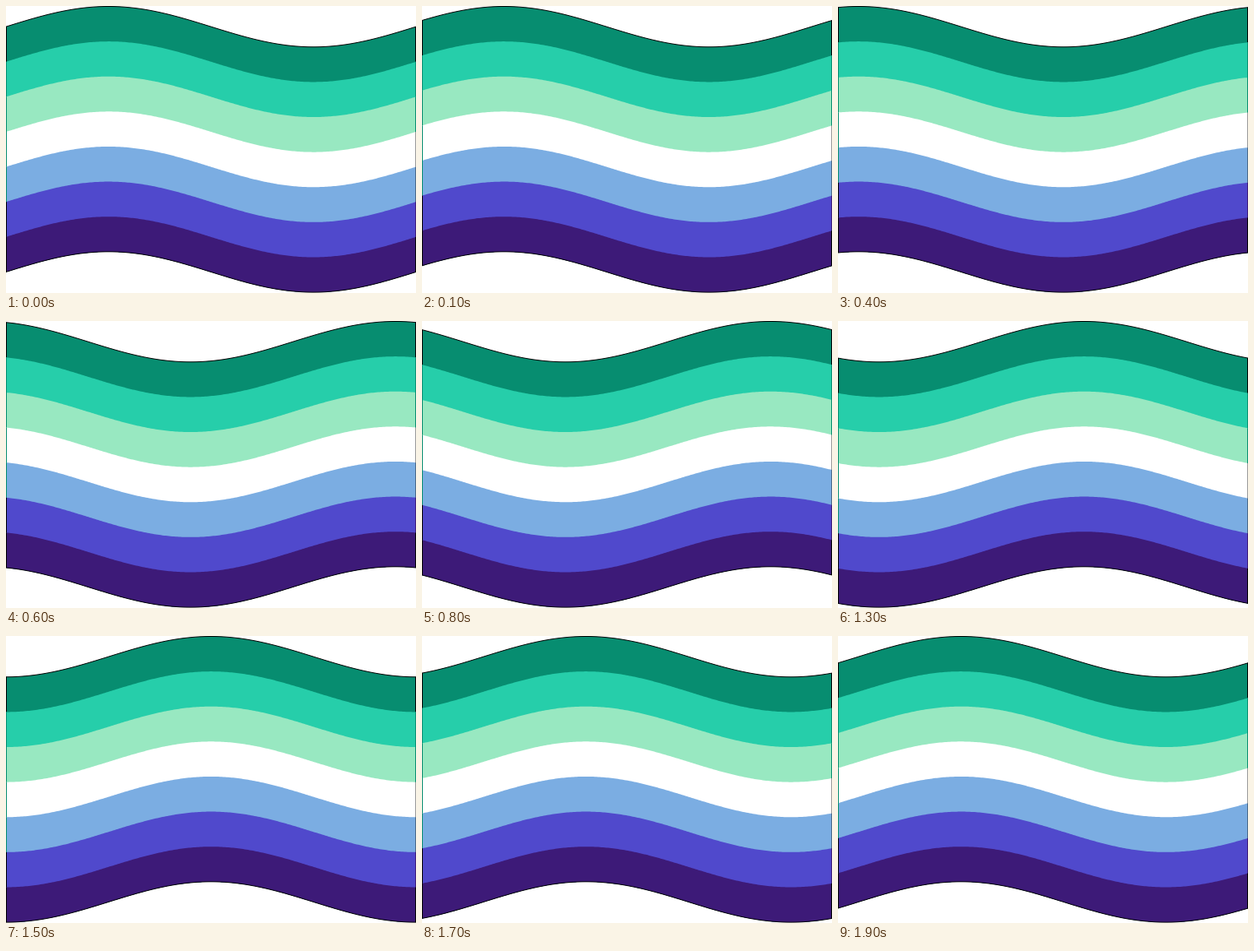
Recreate the animation shown at these times as an HTML page with a canvas. Size 498x349 px, loop 2000 ms.

```html
<!DOCTYPE html>
<html lang="en">
<head>
<meta charset="utf-8">
<title>Waving flag</title>
<style>
  html, body { margin: 0; width: 100%; height: 100%; overflow: hidden; background: #fff; }
  canvas { display: block; width: 498px; height: 349px; }
</style>
</head>
<body>
<canvas id="flag" width="498" height="349"></canvas>
<script>
const W = 498, H = 349, STEP = 100, STEPS = 20;
const AMPLITUDE = 24.65, TOP = 0.5, STRIPE = 298.3 / 7;
const COLORS = ['#078d70', '#26ceaa', '#98e8c1', '#ffffff', '#7bade2', '#5049cc', '#3d1a78'];
const LEFT_EDGE = ['#000', '#078d70', '#078d70', '#078d70', '#078d70', '#000', '#000'];
const RIGHT_EDGE = ['#000', '#078d70', '#078d70', 'rgba(0,0,0,.4)', 'rgba(0,0,0,.4)', '#3d1a78', '#000'];
const ctx = document.getElementById('flag').getContext('2d');

function waveY(x, crest) {
  return TOP + AMPLITUDE * (1 - Math.cos(2 * Math.PI * (x - crest) / W));
}

function wavePath(crest, offset) {
  ctx.beginPath();
  for (let x = 0; x <= W; x += 2) ctx.lineTo(x, waveY(x, crest) + offset);
}

function draw(step) {
  const crest = W / 4 - W * step / STEPS;
  ctx.fillStyle = '#fff';
  ctx.fillRect(0, 0, W, H);

  // Each stripe reaches the bottom hem; the next one covers its lower part.
  const hem = STRIPE * COLORS.length;
  COLORS.forEach((color, i) => {
    wavePath(crest, i * STRIPE);
    for (let x = W; x >= 0; x -= 2) ctx.lineTo(x, waveY(x, crest) + hem);
    ctx.fillStyle = color;
    ctx.fill();
  });

  ctx.strokeStyle = '#000';
  ctx.lineWidth = 1;
  for (const offset of [0, hem]) {
    wavePath(crest, offset);
    ctx.stroke();
  }

  const side = waveY(0, crest);
  COLORS.forEach((_, i) => {
    const y = side + i * STRIPE;
    ctx.fillStyle = LEFT_EDGE[i];
    ctx.fillRect(0, y, 1, STRIPE);
    ctx.fillStyle = RIGHT_EDGE[i];
    ctx.fillRect(W - 1, y, 1, STRIPE);
  });
}

let shown = 0;
draw(shown);
function tick() {
  const step = Math.floor(performance.now() / STEP) % STEPS;
  if (step !== shown) draw(shown = step);
  requestAnimationFrame(tick);
}
requestAnimationFrame(tick);
</script>
</body>
</html>
```
